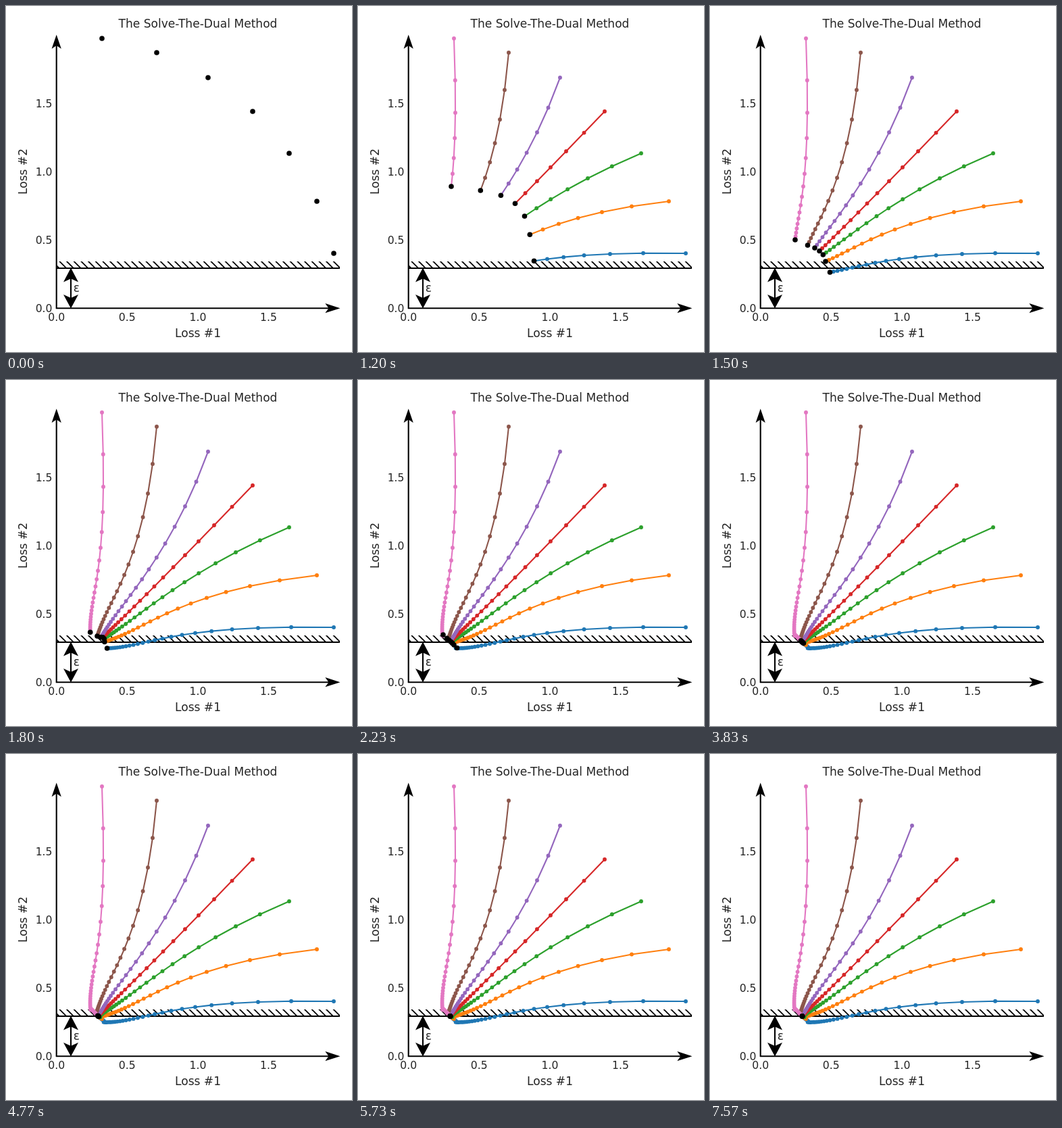
Write an HTML page that moves like this. It is 512 by 512 pixels and loops after 7.66 s.

```html
<!DOCTYPE html>
<html lang="en">
<head>
<meta charset="utf-8">
<title>The Solve-The-Dual Method</title>
<style>
  html, body { margin: 0; width: 100%; height: 100%; overflow: hidden; background: #fff; }
  svg { display: block; width: 100%; height: 100%; }
  text { font-family: "DejaVu Sans", sans-serif; font-size: 17.07px; fill: #262626; text-anchor: middle; }
  .tick text { font-size: 15.64px; }
  .tick .y { text-anchor: end; }
  .axis { stroke: #000; stroke-width: 2.1; fill: none; }
  .trail path { fill: none; stroke-linejoin: round; stroke-linecap: round; }
  .line { stroke-width: 2.1; }
  .dots { stroke-width: 5.9; }
</style>
</head>
<body>
<svg id="stage" viewBox="0 0 512 512">
  <text x="284" y="32">The Solve-The-Dual Method</text>
  <text x="284" y="490">Loss #1</text>
  <text transform="translate(31 245) rotate(-90)">Loss #2</text>
  <g id="ticks" class="tick"></g>
  <path id="hatch" stroke="#000" stroke-width="1.78" clip-path="url(#band)"/>
  <clipPath id="band"><rect x="75" y="378" width="419" height="10"/></clipPath>
  <path class="axis" d="M75 388H494M74.7 448V56M74 447.2H480M96 402V434"/>
  <path d="M74.7 42.5L81.8 63.2L74.7 58.5L67.6 63.2Z
           M494.5 447.2L472.3 454.3L477.5 447.2L472.3 440.1Z
           M96 387.5L107 408.5L96 403.5L85 408.5Z
           M96 447.5L107 427L96 432L85 427Z"/>
  <text x="104.3" y="423">ε</text>
  <g id="trails"></g>
  <g id="heads"></g>
</svg>
<script>
const LOOP = 7660, FRAME = 100 / 3, FIRST = 30, LAST = 197;
const DECAY = 0.966, GOAL = [136.5, 388];

// Position of each run after these many descent steps
const KEYS = [0, 2, 6, 15, 37];
const RUNS = [
  ['#1f77b4', [485, 366], [373, 367], [260.5, 377.3], [177.5, 394], [146.5, 396.5]],
  ['#ff7f0e', [460, 289], [361, 305], [254.3, 338.3], [171, 378], [142, 392]],
  ['#2ca02c', [419, 218], [340, 255], [246.5, 311], [167.3, 368], [139.6, 389.4]],
  ['#d62728', [365, 156], [308, 215], [232.5, 292.3], [162, 362.5], [137.3, 387.3]],
  ['#9467bd', [299, 106], [265, 187], [211.4, 280.2], [155, 358], [134.7, 385]],
  ['#8c564b', [223, 69], [210, 168], [181.3, 273], [144.5, 354], [131.6, 382.3]],
  ['#e377c2', [142, 48], [144, 158], [138, 267], [126, 346], [126, 377]]
];

const $ = id => document.getElementById(id);

function add(parent, tag, attrs, label) {
  const el = document.createElementNS('http://www.w3.org/2000/svg', tag);
  for (const key in attrs) el.setAttribute(key, attrs[key]);
  if (label) el.textContent = label;
  return parent.appendChild(el);
}

// Polynomial in s = DECAY^n through the keys and the goal
const nodes = [...KEYS.map(k => DECAY ** k), 0];

function weights(s) {
  return nodes.map((a, i) =>
    nodes.reduce((w, b, j) => i === j ? w : w * (s - b) / (a - b), 1));
}

function locate(keys, n) {
  const s = DECAY ** n, near = keys[4];
  if (n > 37) return GOAL.map((g, c) => g + (near[c] - g) * s / nodes[4]);
  const w = weights(s), all = [...keys, GOAL];
  return [0, 1].map(c => all.reduce((sum, p, i) => sum + p[c] * w[i], 0));
}

for (let i = 0; i < 4; i++) {
  const label = (i / 2).toFixed(1);
  add($('ticks'), 'text', { x: 74.7 + 104.6 * i, y: 465.5 }, label);
  add($('ticks'), 'text', { x: 68.5, y: 453 - 100.9 * i, class: 'y' }, label);
}

let hatch = '';
for (let x = 58; x < 500; x += 32 / 3) hatch += `M${x - 2} 376l14 14`;
$('hatch').setAttribute('d', hatch);

const runs = RUNS.map(([color, ...keys]) => {
  const group = add($('trails'), 'g', { class: 'trail', stroke: color });
  return {
    points: Array.from({ length: LAST + 1 }, (_, n) => locate(keys, n).map(v => v.toFixed(2))),
    line: add(group, 'path', { class: 'line' }),
    dots: add(group, 'path', { class: 'dots' }),
    head: add($('heads'), 'circle', { r: 3.8 })
  };
});

function draw(t) {
  const tick = Math.floor((Math.floor(t / 10) * 10 + 5) / FRAME);
  const n = Math.min(LAST, Math.max(0, tick - FIRST));
  for (const run of runs) {
    const seen = run.points.slice(0, n + 1);
    const [x, y] = seen[n];
    run.line.setAttribute('d', 'M' + seen.map(p => p.join(' ')).join('L'));
    run.dots.setAttribute('d', n ? seen.map(p => `M${p.join(' ')}h0`).join('') : '');
    run.head.setAttribute('cx', x);
    run.head.setAttribute('cy', y);
  }
}

const start = performance.now();
function loop() {
  draw((performance.now() - start) % LOOP);
  requestAnimationFrame(loop);
}
loop();
</script>
</body>
</html>
```
